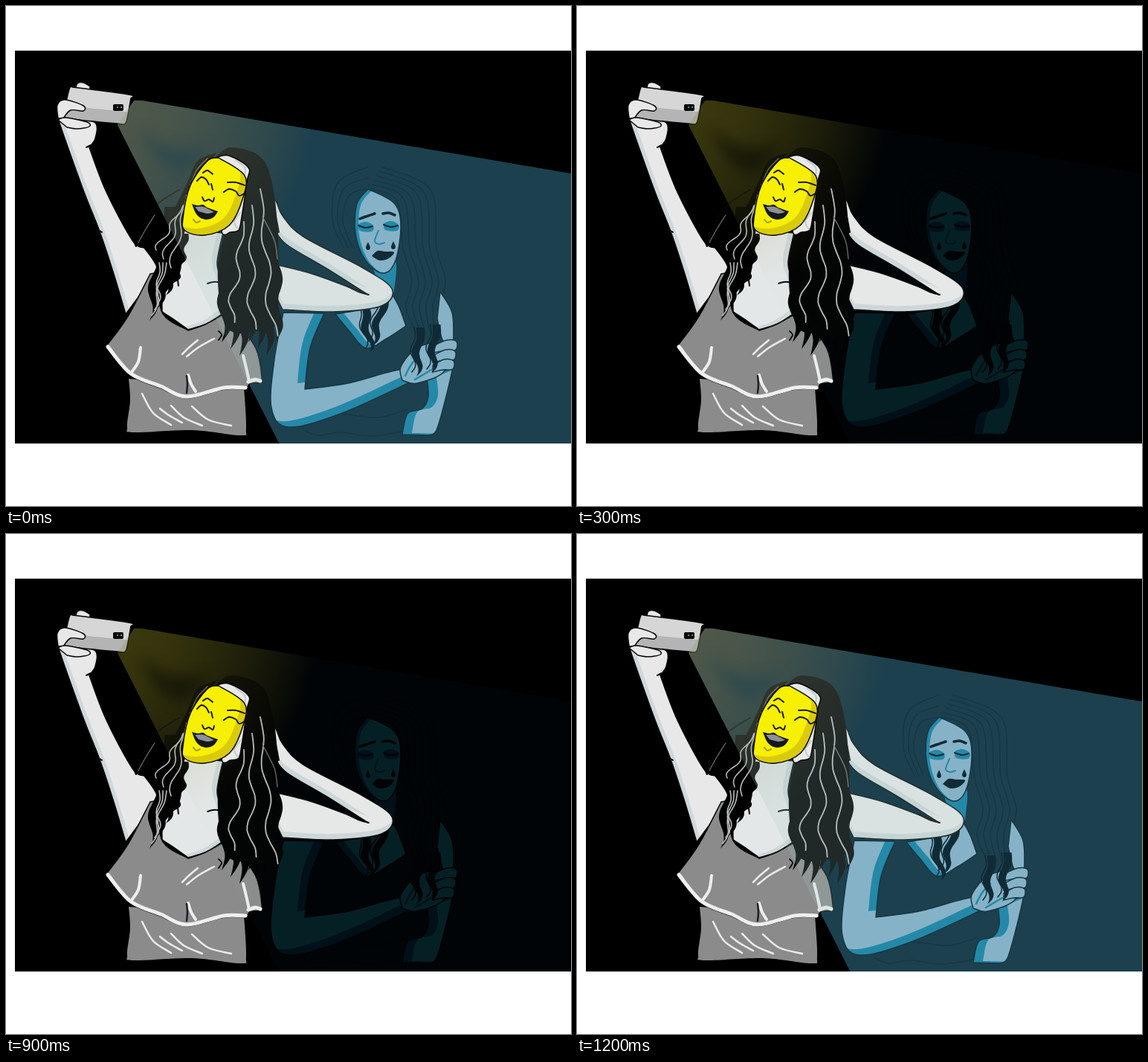
These frames come from a looping animation (760 by 672 pixels, 1.7 s). An HTML page with a canvas:

```html
<!DOCTYPE html>
<html lang="en">
<head>
<meta charset="utf-8">
<title>Selfie and shadow</title>
<style>
html, body { margin: 0; width: 100%; height: 100%; overflow: hidden; background: #fff; }
canvas { display: block; }
</style>
</head>
<body>
<canvas id="stage" width="760" height="672"></canvas>
<script>
const stage = document.getElementById('stage').getContext('2d');
const layer = Object.assign(document.createElement('canvas'), { width: 760, height: 672 });
const front = layer.getContext('2d');
let ctx = stage;

const LOOP = 1700, FADE = 900, STEP = 100, DARK = 4;
const SKIN = '#e8e8e8', SKIN_SHADE = '#ced8da', DRESS = '#8b8b8b', INK = '#050505';

// Colours of the lit side, from full beam to darkness
const LEVELS = [
  { beam: '#1c404e', skin: '#86b2c7', shade: '#2489a8', line: '#163744', lock: '#102b36', glow: '150,122,68', veil: 0.2 },
  { beam: '#0e2a35', skin: '#628694', shade: '#12637a', line: '#0f242b', lock: '#081b22', glow: '148,128,50', veil: 0.12 },
  { beam: '#00141c', skin: '#3d5a60', shade: '#003d4d', line: '#0a1114', lock: '#010b0f', glow: '150,140,40', veil: 0.05 },
  { beam: '#010406', skin: '#042025', shade: '#001019', line: '#000203', lock: '#000203', glow: '140,130,25', veil: 0.02 },
  { glow: '120,105,8', veil: 0 }
];

// Adds a smooth curve through the points
function curve(path, pts) {
  const at = i => pts[Math.max(0, Math.min(i, pts.length - 1))];
  for (let i = 0; i < pts.length - 1; i++) {
    const [a, b, c, d] = [at(i - 1), at(i), at(i + 1), at(i + 2)];
    path.bezierCurveTo(b[0] + (c[0] - a[0]) / 6, b[1] + (c[1] - a[1]) / 6,
      c[0] - (d[0] - b[0]) / 6, c[1] - (d[1] - b[1]) / 6, c[0], c[1]);
  }
}

// Points as text; a slash makes a corner
function trace(text) {
  const path = new Path2D();
  let last;
  for (const part of text.split('/')) {
    const pts = part.trim().split(/\s+/).map(p => p.split(',').map(Number));
    if (last) pts.unshift(last);
    else path.moveTo(...pts[0]);
    curve(path, pts);
    last = pts[pts.length - 1];
  }
  return path;
}

// Fills an outline; a shift leaves a shaded rim on the side it moves away from
function shape(text, fill, edge, shade, dx = 0, dy = 0) {
  const path = trace(text);
  path.closePath();
  ctx.fillStyle = shade || fill;
  ctx.fill(path);
  if (shade) {
    ctx.save();
    ctx.clip(path);
    ctx.translate(dx, dy);
    ctx.fillStyle = fill;
    ctx.fill(path);
    ctx.restore();
  }
  if (edge) {
    ctx.strokeStyle = edge;
    ctx.lineWidth = 1.5;
    ctx.stroke(path);
  }
}

function lines(color, width, ...list) {
  ctx.strokeStyle = color;
  ctx.lineWidth = width;
  for (const text of list) ctx.stroke(trace(text));
}

// Wavy line from root to tip; side pushes it out to one edge of a lock
function wave(x0, y0, x1, y1, amp, turns, side = 0) {
  const n = Math.ceil(turns * 6);
  return Array.from({ length: n + 1 }, (_, i) => {
    const t = i / n;
    return [x0 + (x1 - x0) * t + amp * Math.sqrt(t) * Math.sin(2 * Math.PI * turns * t) + side * (1 - t ** 4),
      y0 + (y1 - y0) * t];
  });
}

function lock(color, width, x0, y0, x1, y1, amp = 4, turns = 2.5) {
  const path = new Path2D(), edge = side => wave(x0, y0, x1, y1, amp, turns, side);
  const left = edge(-width / 2), right = edge(width / 2).reverse();
  path.moveTo(...left[0]);
  curve(path, left);
  path.lineTo(...right[0]);
  curve(path, right);
  ctx.fillStyle = color;
  ctx.fill(path);
}

function strand(color, width, x0, y0, x1, y1, amp = 5, turns = 2.5) {
  const path = new Path2D(), pts = wave(x0, y0, x1, y1, amp, turns);
  path.moveTo(...pts[0]);
  curve(path, pts);
  ctx.strokeStyle = color;
  ctx.lineWidth = width;
  ctx.stroke(path);
}

const BEAM = trace('172,127 / 183,127 / 760,225 / 760,588 / 368,588 / 150,160');

function fillGlow(rgb, alpha) {
  const g = ctx.createRadialGradient(158, 135, 5, 158, 135, 260);
  for (const t of [0, 0.25, 0.5, 0.75, 1]) g.addColorStop(t, `rgba(${rgb},${alpha * (1 - t ** 1.5)})`);
  ctx.fillStyle = g;
  ctx.fill(BEAM);
}

function drawGlow(c) {
  fillGlow(c.glow, 0.42);
  // a dim wisp in the light
  ctx.save();
  ctx.clip(BEAM);
  ctx.filter = 'blur(9px)';
  ctx.globalAlpha = 0.45;
  ctx.fillStyle = c.beam || '#000';
  ctx.fill(trace('178,165 225,190 275,190 / 235,225 200,205'));
  ctx.restore();
}

function drawShadowWoman(c) {
  // hair and hem
  for (let i = 0; i < 6; i++) {
    const s = i * 9;
    lines(c.line, 1.4, `${490 + i * 3},${246 - i * 6} ${526 + s},${262 - i * 3} ${534 + s},325 ${546 + s},370 ${538 + s},405 ${552 + s * 0.7},440`);
    if (i < 3) lines(c.line, 1.4, `487,${246 - i * 15} ${462 - i * 8},${254 - i * 8} ${453 - i * 7},288 ${466 - i * 6},325`);
  }
  lines(c.line, 1.5, '400,570 420,577 450,573 490,578 533,572', '413,552 450,548 500,553 540,542');
  // neck, chest and face
  shape('490,340 / 523,340 522,385 / 500,372', c.shade);
  shape('443,414 462,437 484,460 512,447 538,430 / 529,405 520,388 / 500,405', c.skin, c.line, c.shade, 9, -4);
  shape('487,246 472,266 470,305 483,341 507,359 524,342 531,295 522,265 487,246', c.skin, c.line, c.shade, 5, 2);
  // features
  for (const [x, y] of [[484, 297], [518, 296]]) {
    shape(`${x - 10},${y - 4} ${x},${y - 7} ${x + 10},${y - 2} ${x + 8},${y + 6} ${x - 8},${y + 5} ${x - 10},${y - 4}`, c.shade);
    lines(c.lock, 2, `${x - 10},${y - 2} ${x},${y + 1} ${x + 9},${y - 1}`);
    shape(`${x + 3},${y + 20} ${x + 6},${y + 28} ${x + 3},${y + 31} ${x},${y + 28} ${x + 3},${y + 20}`, c.lock);
  }
  lines(c.lock, 3.5, '476,286 484,283 496,279', '507,279 515,278 523,281');
  lines(c.shade, 2, '501,302 496,316 502,320 509,318');
  shape('492,336 500,329 510,330 522,331 515,339 503,342 492,336', c.lock);
  // arms
  shape('584,384 600,412 602,448 / 588,450 580,420', c.skin, c.line);
  shape('601,486 592,525 579,570 568,577 / 533,576 / 540,548 560,541 568,525 566,500', c.skin, c.line, c.shade, 13, -2);
  shape('373,412 361,475 357,540 380,566 450,548 543,506 / 535,488 460,507 402,515 / 409,460 428,413', c.skin, c.line, c.shade, -10, -8);
  // hand
  shape('533,503 531,485 552,460 582,455 590,490 553,507 533,503', c.skin, c.line);
  for (let i = 0; i < 3; i++) {
    const y = 457 + i * 13, x = 599 - i * 2;
    shape(`574,${y} ${x - 6},${y - 8} ${x + 7},${y - 6} ${x + 6},${y + 5} ${x - 7},${y + 6} 574,${y + 9}`, c.skin, c.line);
  }
  lines(c.shade, 2.5, '537,497 545,482 556,470', '550,502 562,495 572,489');
  // loose locks
  for (const [x, y, end] of [[482, 400, 490], [510, 392, 492], [557, 432, 552], [579, 428, 572]]) {
    lock(c.lock, 11, x, y, end, y + 66, 5, 1.5);
    strand(c.lock, 1.5, x - 8, y, end - 6, y + 60, 5, 1.5);
  }
}

function drawRaisedArm() {
  shape('94,110 96,104 104,103 113,108 / 113,114', SKIN, INK);
  shape('70,151 78,175 105,250 126,303 144,357 161,414 / 192,372 203,352 186,325 / 170,315 135,250 112,190 / 120,178 121,158 100,150', SKIN, INK, SKIN_SHADE, 5, -4);
  lines(INK, 2, '108,190 114,187', '124,301 129,304', '171,314 175,323');
  // phone
  shape('89,109 / 165,119 168,124 / 162,155 157,159 / 80,151 77,147 / 85,112 89,109', '#d6d6d6', INK, '#b4b3b5', 4, -17);
  ctx.fillStyle = '#080808';
  ctx.beginPath();
  ctx.roundRect(144, 132, 14, 9, 2);
  ctx.fill();
  ctx.fillStyle = '#777';
  for (const x of [149, 154]) ctx.fillRect(x, 135, 2, 2);
  // fingers
  shape('70,151 69,133 79,126 104,134 104,141 87,140 77,151', SKIN, INK);
  shape('70,153 80,150 109,156 112,162 96,165 82,163', SKIN, INK);
}

function drawBentArm() {
  shape('350,246 363,262 372,282 400,310 480,352 519,380 505,403 440,411 372,408 / 360,380 360,347 / 415,361 487,388 / 430,352 378,321 362,302 / 346,270', SKIN, INK, SKIN_SHADE, 1, -8);
  lines(INK, 2, '353,258 362,280 367,304', '460,377 474,384 488,388');
}

function drawDress() {
  shape('165,501 167,530 163,566 172,573 250,570 315,577 323,568 320,512', DRESS);
  shape('194,360 164,417 135,457 / 167,496 207,513 243,527 293,515 325,515 / 328,508 345,506 / 336,460 300,410 / 270,427 245,436 / 210,412 206,358', DRESS, INK);
  lines('#efefef', 5, '137,458 168,494 208,511 243,525 293,513 322,513', '326,505 335,502 342,504');
  lines('#eee', 4, '181,459 178,478 169,492', '245,496 249,508 255,518', '319,470 323,486 327,504');
  lines('#162130', 2.5, '243,497 244,508 243,520');
  // sheen
  lines('#ececec', 2.5, '237,468 246,459 258,449', '243,471 260,458 280,447',
    '183,521 198,547 222,563', '207,541 219,550 237,560', '222,537 239,553 264,564', '250,538 272,556 303,564');
}

function drawHair() {
  // left side
  shape('284,197 258,208 243,239 222,282 204,322 / 234,335 240,300 250,240', '#000');
  for (let i = 0; i < 4; i++) lock('#000', 17, 222 + i * 5, 270 + i * 12, 193 + i * 11, 423 - i * 17, 5, 2.5);
  // right side
  shape('282,203 302,190 340,201 357,234 366,310 366,430 / 300,435 285,350 305,300 322,240 300,203', '#000');
  for (let i = 0; i < 7; i++) lock('#000', 22, 304 + i * 8, 285, 293 + i * 12, 452 + 9 * (i % 3), 5, 2.6);
  lines(INK, 1.8, '233,247 205,265 188,287 176,318', '204,365 217,358 227,367', '286,437 290,442 286,449');
  // light strands
  const pale = '#b9bdbd';
  for (let i = 0; i < 3; i++) {
    strand(pale, 1.6, 248 - i * 5, 240 + i * 14, 222 - i * 10, 352 - i * 12, 5, 2);
    strand(pale, 1.6, 216 - i * 5, 345, 196 + i * 4, 416 - i * 8, 4, 1.5);
    strand(pale, 1.8, 320 + i * 11, 290 - i * 22, 301 + i * 29, 425 + i * 9, 7, 2.3);
  }
  lines('#676b6a', 1.3, '271,205 257,220 249,239', '200,281 188,300 178,318', '345,283 361,315 365,340');
}

function drawNeck() {
  shape('237,300 237,330 232,362 212,388 210,411 / 227,422 245,435 / 270,427 296,410 / 290,370 284,345 292,305', '#e4e7e7', INK, SKIN_SHADE, -7, -3);
  lines(INK, 2, '237,315 237,340 231,360 232,376', '271,373 278,371 287,371');
}

function drawFace() {
  // headband and cheek
  shape('280,205 299,201 326,217 324,236 317,284 313,301 302,304 / 290,300 300,215', '#e9e9e9', INK);
  lines('#c1caca', 2, '309,207 321,217 321,229', '315,278 307,290 312,300');
  // mask
  shape('286,204 271,208 248,241 238,285 241,302 267,308 300,295 318,260 321,228 286,204', '#f7f000', INK, '#d9cb0c', -8, -9);
  lines('#171708', 2, '265,224 271,221 278,226', '298,237 309,237 321,241', '257,235 263,230 269,233 273,240',
    '293,250 300,246 309,249 314,255 322,251', '276,239 278,247', '264,257 267,262 273,260 278,263 280,258');
  lines('#a79c10', 2, '252,287 256,291 261,289');
  shape('250,266 258,268 265,267 271,271 285,276 / 279,284 268,287 257,281 250,266', '#15171c');
  shape('254,270 266,270 280,277 / 271,279 259,276', '#8c9196');
}

function drawFrontWoman(c) {
  ctx = front;
  ctx.clearRect(0, 0, 760, 672);
  ctx.lineCap = ctx.lineJoin = 'round';
  drawRaisedArm();
  drawBentArm();
  drawNeck();
  drawDress();
  drawHair();
  // light falling on the figure
  ctx.globalCompositeOperation = 'source-atop';
  ctx.fillStyle = `rgba(160,205,200,${c.veil})`;
  ctx.fill(BEAM);
  fillGlow(c.glow, 0.2);
  ctx.globalCompositeOperation = 'source-over';
  drawFace();
  ctx = stage;
  ctx.drawImage(layer, 0, 0);
}

function draw(level) {
  const c = LEVELS[level];
  ctx.fillStyle = '#fff';
  ctx.fillRect(0, 0, 760, 672);
  ctx.fillStyle = '#000';
  ctx.fillRect(12, 60, 748, 528);
  ctx.lineCap = ctx.lineJoin = 'round';
  if (level < DARK) {
    ctx.fillStyle = c.beam;
    ctx.fill(BEAM);
    drawShadowWoman(c);
  }
  drawGlow(c);
  drawFrontWoman(c);
}

// The light steps down, rests in the dark, steps back up and rests
function levelAt(time) {
  const step = Math.floor(time / STEP), back = FADE / STEP;
  return step < back ? Math.min(step, DARK) : Math.max(DARK - 1 - (step - back), 0);
}

let shown = -1;
function tick() {
  const level = levelAt(performance.now() % LOOP);
  if (level !== shown) draw(shown = level);
  requestAnimationFrame(tick);
}
tick();
</script>
</body>
</html>
```
